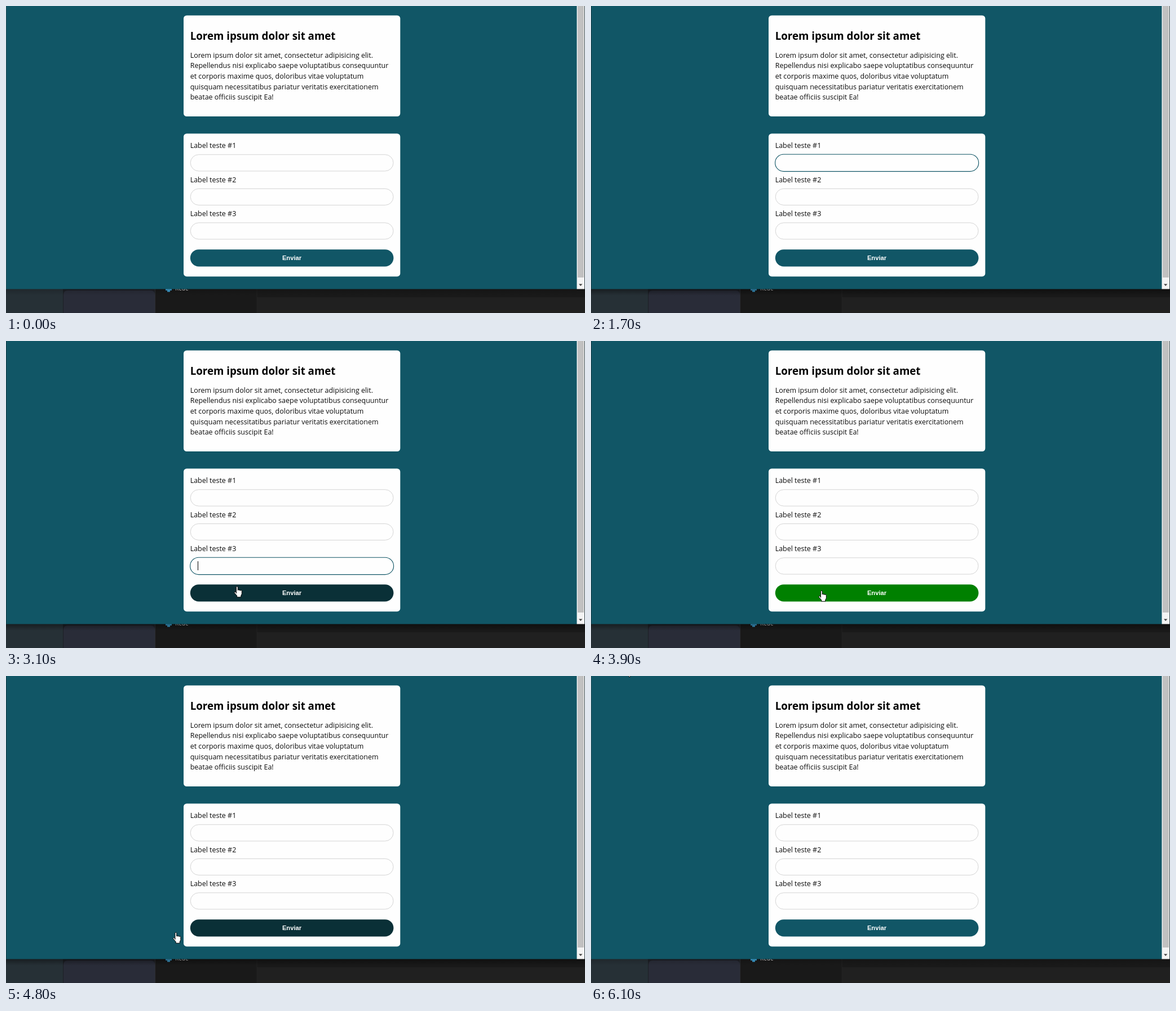
An HTML page for the animation above (6200 ms loop, 1027x545 px).

```html
<!DOCTYPE html>
<html lang="pt">
<head>
<meta charset="utf-8">
<title>Form demo</title>
<style>
  html, body { margin: 0; width: 100%; height: 100%; overflow: hidden; background: #191919; }
  svg { display: block; width: 100%; height: 100%; }
  text { font: 12.48px "Open Sans", sans-serif; fill: #0c0c0c; }
  .title { font-size: 18.72px; font-weight: 700; fill: #000; }
  .send { font: bold 11.2px "Liberation Sans", Arial, sans-serif; fill: #fff; text-anchor: middle; }
  .tree { font-size: 10px; fill: #ddd; }
  .cursor { fill: #fff; stroke: #000; stroke-width: .9; stroke-linejoin: round; }
</style>
</head>
<body>
<svg viewBox="0 0 1027 545">
  <defs>
    <linearGradient id="fade" x2="0" y2="1">
      <stop offset="0" stop-color="#000" stop-opacity=".4"/>
      <stop offset="1" stop-color="#000" stop-opacity="0"/>
    </linearGradient>
  </defs>

  <!-- windows behind the page -->
  <rect y="500" width="102" height="45" fill="#263036"/>
  <rect x="101" y="500" width="164" height="45" fill="#1d2026"/>
  <path d="M102 545V513q0-8 8-8H256q8 0 8 8V545Z" fill="#292c38"/>
  <rect x="264" y="500" width="1" height="45" fill="#2c2e33"/>
  <rect x="265" y="500" width="762" height="45" fill="#191919"/>
  <rect x="445" y="517" width="582" height="28" fill="#202020"/>
  <rect x="444.5" y="503" width="1" height="42" fill="#232323"/>
  <path d="M283 498h11v7h-3v2.5h-5v-2.5h-3Z" fill="#3d9fd0"/>
  <text class="tree" x="300" y="505">Rede</text>
  <rect id="shadow" y="502" width="1027" height="12" fill="url(#fade)"/>

  <!-- page and scrollbar -->
  <rect width="1013" height="502.5" fill="#115666"/>
  <rect id="edge" width="1" height="502.5"/>
  <rect x="1012.5" width="13.5" height="502.5" fill="#f4f4f4"/>
  <rect x="1014" width="11" height="482" fill="#c1c1c1"/>
  <path d="M1016 493.5h6.4l-3.2 3.6Z" fill="#404040"/>
  <rect x="1026" width="1" height="502.5" fill="#37474c"/>

  <rect x="315" y="16.7" width="384.3" height="179.3" rx="5.5" fill="#fefefe"/>
  <text class="title" x="326.7" y="60">Lorem ipsum dolor sit amet</text>
  <g id="paragraph"></g>

  <rect x="315" y="226.6" width="384.3" height="253.6" rx="5.5" fill="#fefefe"/>
  <g id="fields"></g>
  <rect id="button" x="326.8" y="432.2" width="360.6" height="30.2" rx="15.1"/>
  <text class="send" x="507" y="451.3">Enviar</text>

  <rect id="caret" x="340" width="1" height="16" fill="#000"/>
  <path id="arrow" class="cursor" d="M.5 .5V13.7L3.5 11L5.7 16L8 15L5.9 10.1H10Z"/>
  <g id="hand">
    <path class="cursor" transform="translate(-.7 -.5) scale(1.08)" d="M3.8 12V2a1.3 1.3 0 0 1 2.6 0V7a1.1 1.1 0 0 1 2.2 .3a1.1 1.1 0 0 1 2.2 .5a1.1 1.1 0 0 1 2.2 .6V13L11.5 16V18.3H5V16L1 11.5Q.2 10 1.4 9.4Q2.4 9 3.8 11Z"/>
  </g>
</svg>
<script>
const LOOP = 6200, STEP = 100;
const TEAL = '#115666', DARK = '#0a3037', GREEN = '#008000';
const TEXT_X = 326.7;
const el = id => document.getElementById(id);

function add(parent, tag, attributes, content = '') {
  const node = document.createElementNS('http://www.w3.org/2000/svg', tag);
  for (const name in attributes) node.setAttribute(name, attributes[name]);
  node.textContent = content;
  el(parent).append(node);
  return node;
}

['Lorem ipsum dolor sit amet, consectetur adipisicing elit.',
 'Repellendus nisi explicabo saepe voluptatibus consequuntur',
 'et corporis maxime quos, doloribus vitae voluptatum',
 'quisquam necessitatibus pariatur veritatis exercitationem',
 'beatae officiis suscipit Ea!'
].forEach((line, i) => add('paragraph', 'text', { x: TEXT_X, y: 91.6 + i * 18.7 }, line));

const fieldTop = i => 263.4 + i * 60.5;
const rings = [0, 1, 2].map(i => {
  add('fields', 'text', { x: TEXT_X, y: 251.8 + i * 60.8 }, `Label teste #${i + 1}`);
  const box = (grow, style) => add('fields', 'rect', {
    x: 327.2 - grow, y: fieldTop(i) + .4 - grow, width: 359.8 + 2 * grow,
    height: 29.2 + 2 * grow, rx: 14.6 + grow, fill: '#fefefe', ...style
  });
  box(0, { stroke: '#d0d0d0', 'stroke-width': .9 });
  return box(.6, { stroke: TEAL, 'stroke-width': 1.1 });
});

// Pointer phases: shape, start, end of move, end of phase, from x, y, to x, y
const phases = [
  ['arrow', 200, 700, 800, 66, -8, 380, 262],
  ['arrow', 2900, 2900, 3100, 408, 422, 408, 422],
  ['hand', 3100, 3300, 4400, 405, 435.5, 404, 443],
  ['hand', 4400, 4800, 5000, 400, 444, 296.5, 455],
  ['arrow', 5000, 5200, 5500, 270, 454, 230, 446],
  ['arrow', 5500, 5900, 6200, 205, 370, 62, -14]
];
const focusStarts = [1100, 2000, 2700, 3900];

const show = (node, visible) => node.setAttribute('visibility', visible ? 'visible' : 'hidden');

function draw(t) {
  const active = t >= 1100 && t < 6100;
  el('shadow').setAttribute('opacity', active ? 1 : .45);
  el('edge').setAttribute('fill', active ? '#153c46' : '#27505b');

  const focus = rings.findIndex((_, i) => t >= focusStarts[i] && t < focusStarts[i + 1]);
  rings.forEach((ring, i) => show(ring, i === focus));
  show(el('caret'), focus >= 0 && (t - focusStarts[focus]) % 1000 < 500);
  if (focus >= 0) el('caret').setAttribute('y', Math.round(fieldTop(focus) + 6.8));

  const fill = t < 3100 || t >= 5000 ? TEAL : t >= 3900 && t < 4400 ? GREEN : DARK;
  el('button').setAttribute('fill', fill);

  const phase = phases.find(p => t >= p[1] && t < p[3]);
  for (const shape of ['arrow', 'hand']) show(el(shape), phase && phase[0] === shape);
  if (phase) {
    const [shape, start, stop, , x0, y0, x1, y1] = phase;
    const k = stop > start ? Math.min(1, (t - start) / (stop - start)) : 1;
    el(shape).setAttribute('transform', `translate(${x0 + (x1 - x0) * k} ${y0 + (y1 - y0) * k})`);
  }
}

const origin = performance.now();
function tick() {
  const t = (performance.now() - origin) % LOOP;
  draw(Math.floor(t / STEP) * STEP);
  requestAnimationFrame(tick);
}
tick();
</script>
</body>
</html>
```
